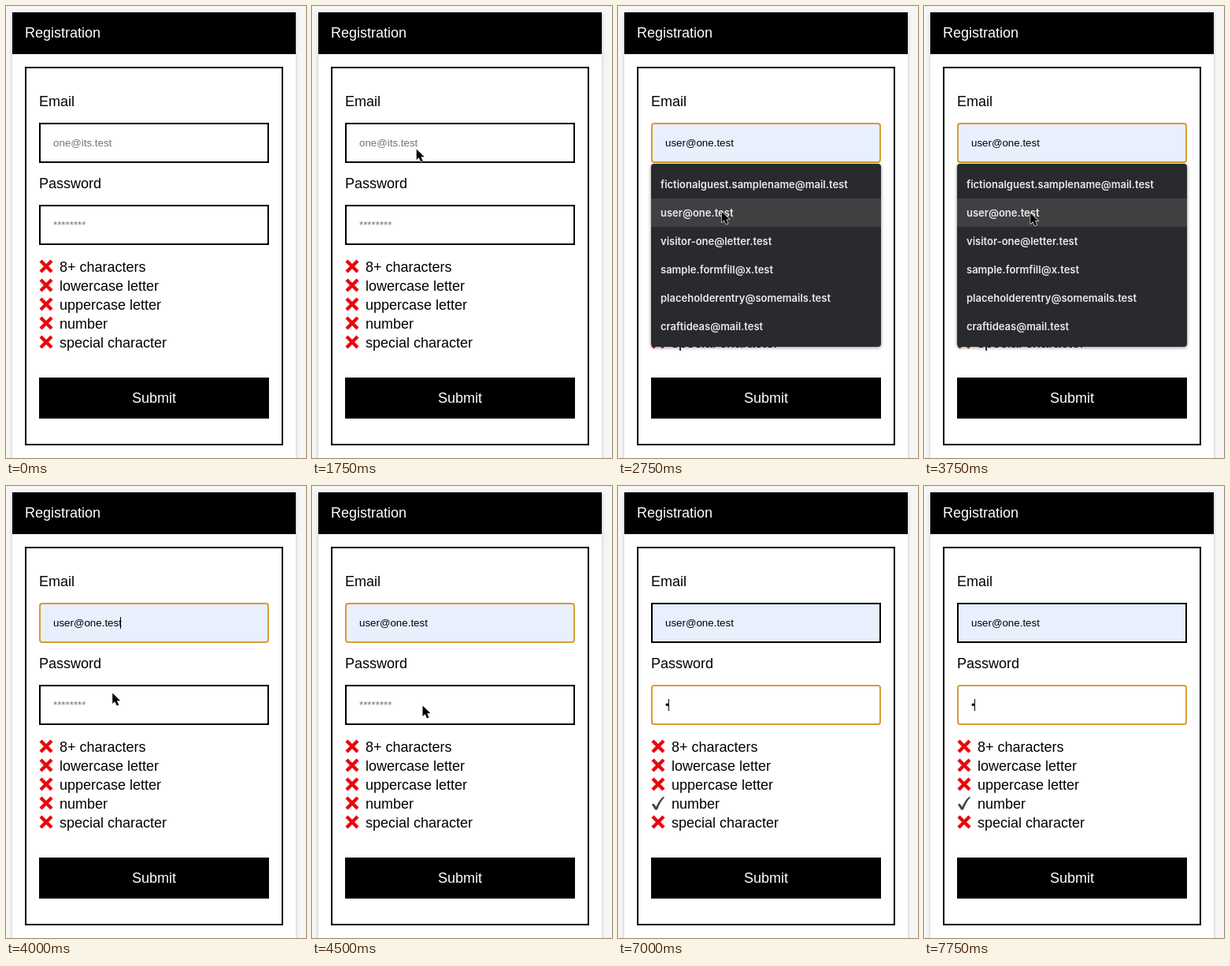
An HTML page for the animation above (8000 ms loop, 381x573 px).

```html
<!DOCTYPE html>
<html lang="en">
<head>
<meta charset="utf-8">
<title>Registration form</title>
<style>
  html, body { margin: 0; width: 100%; height: 100%; overflow: hidden; background: #f6f6f6; }
  svg { display: block; }
  text { font: 18px "Liberation Sans", Arial, sans-serif; white-space: pre; }
  .field { font-size: 13.333px; }
  .option { font: 600 13px Inter, Roboto, sans-serif; fill: #e8eaed; }
  #card { filter: drop-shadow(0 1px 2px rgba(0, 0, 0, .22)); }
  #menu > rect:first-child { filter: drop-shadow(0 1px 2px rgba(0, 0, 0, .45)); }
</style>
</head>
<body>
<svg id="stage" width="381" height="573" viewBox="0 0 381 573">
  <rect width="381" height="573" fill="#f6f6f6"/>
  <rect id="card" x="8" y="8" width="360" height="600" fill="#fff"/>
  <rect x="8" y="8" width="360" height="53"/>
  <text x="24" y="40" fill="#fff">Registration</text>
  <rect x="25" y="78" width="326" height="478" fill="#fff" stroke="#000" stroke-width="2"/>
  <text x="42" y="127">Email</text>
  <rect id="emailBox" x="43" y="149" width="290" height="49" stroke-width="2"/>
  <text id="emailText" class="field" x="60" y="178"></text>
  <text x="42" y="231">Password</text>
  <rect id="passwordBox" x="43" y="253" width="290" height="49" fill="#fff" stroke-width="2"/>
  <text id="passwordText" class="field" x="60" y="282"></text>
  <g id="rules"></g>
  <rect x="42" y="471" width="292" height="52"/>
  <text x="188" y="503" fill="#fff" text-anchor="middle">Submit</text>
  <g id="menu">
    <rect x="42" y="200" width="292" height="232" rx="4" fill="#292a2d"/>
    <rect id="hover" x="42" y="244" width="292" height="36" fill="#3f4042"/>
  </g>
  <rect id="caret" width="1" height="15"/>
  <path id="cursor" d="M0 0V13.6L3.1 10.7L5.5 16L8 14.9L5.7 9.8H10Z" stroke="#fff" stroke-width="1.2" stroke-linejoin="round" paint-order="stroke"/>
</svg>
<script>
const LOOP = 8000;
const PLACEHOLDER = "one@its.test";
const EMAIL = "user@one.test";
const RULES = ["8+ characters", "lowercase letter", "uppercase letter", "number", "special character"];
const OPTIONS = [
  "fictionalguest.samplename@mail.test",
  EMAIL,
  "visitor-one@letter.test",
  "sample.formfill@x.test",
  "placeholderentry@somemails.test",
  "craftideas@mail.test"
];

// Each step: start time, x, y; the pointer jumps between positions.
const POINTER = [
  [500, 335.7, 6.7], [750, 166.7, 144.7], [1000, 146.7, 175.7], [1250, 145.7, 177.7],
  [1750, 132.7, 181.5], [2750, 131.7, 260.7], [3000, 135.2, 262.5],
  [4250, 136.2, 262.5], [4500, 140.5, 278.5]
];

// Each step: start time, x, y; a missing position hides the caret.
const CARET = [
  [2250, 60, 166], [2750], [3250, 60, 166], [3750], [4000, 145, 166], [4500],
  [5000, 60, 270], [5500], [6000, 60, 270], [6500], [6750, 64, 270], [7250], [7750, 64, 270]
];

const $ = id => document.getElementById(id);
const show = (node, on) => node.setAttribute("display", on ? "inline" : "none");
const current = (steps, t) => steps.filter(step => step[0] <= t).pop();

function add(parent, tag, attrs, text = "") {
  const node = document.createElementNS("http://www.w3.org/2000/svg", tag);
  for (const name in attrs) node.setAttribute(name, attrs[name]);
  node.textContent = text;
  parent.append(node);
  return node;
}

const marks = RULES.map((rule, i) => {
  const y = 330 + i * 24;
  add($("rules"), "text", { x: 68, y: y + 7 }, rule);
  const cross = add($("rules"), "path", {
    d: `M44 ${y - 7}l14 14m0 -14l-14 14`, stroke: "#e8070d", "stroke-width": 4.4, fill: "none"
  });
  const tick = add($("rules"), "path", {
    d: `M43 ${y + 1.8}q2 -2 3.2 -.4l2.2 3.3q3.8 -8.2 8.4 -12.5q2.2 -.7 2.2 .2q-5.8 6.7 -8.8 15.3q-1.6 2 -3.4 .4Z`,
    fill: "#444"
  });
  return { cross, tick };
});

OPTIONS.forEach((option, i) =>
  add($("menu"), "text", { class: "option", x: 54, y: 231 + i * 36 }, option));

function setBox(id, focused, fill) {
  const box = $(id);
  box.setAttribute("stroke", focused ? "#d89b35" : "#000");
  box.setAttribute("rx", focused ? 3 : 0);
  box.setAttribute("fill", fill);
}

function setText(id, value, placeholder) {
  const node = $(id);
  node.textContent = value || placeholder;
  node.setAttribute("fill", value ? "#000" : "#757575");
}

function place(id, step) {
  const visible = step && step.length > 1;
  show($(id), visible);
  if (visible) $(id).setAttribute("transform", `translate(${step[1]} ${step[2]})`);
}

function draw(t) {
  const filled = t >= 2750;
  const typed = t >= 6750;
  setBox("emailBox", t >= 2250 && t < 5000, filled ? "#e8f0fe" : "#fff");
  setBox("passwordBox", t >= 5000, "#fff");
  setText("emailText", filled ? EMAIL : "", PLACEHOLDER);
  setText("passwordText", typed ? "•" : "", "********");
  show($("menu"), t >= 2250 && t < 4000);
  show($("hover"), filled);
  marks.forEach(({ cross, tick }, i) => {
    const passed = typed && RULES[i] === "number";
    show(cross, !passed);
    show(tick, passed);
  });
  place("caret", current(CARET, t));
  place("cursor", typed ? null : current(POINTER, t));
}

const start = performance.now();
function tick() {
  draw((performance.now() - start) % LOOP);
  requestAnimationFrame(tick);
}
tick();
</script>
</body>
</html>
```
